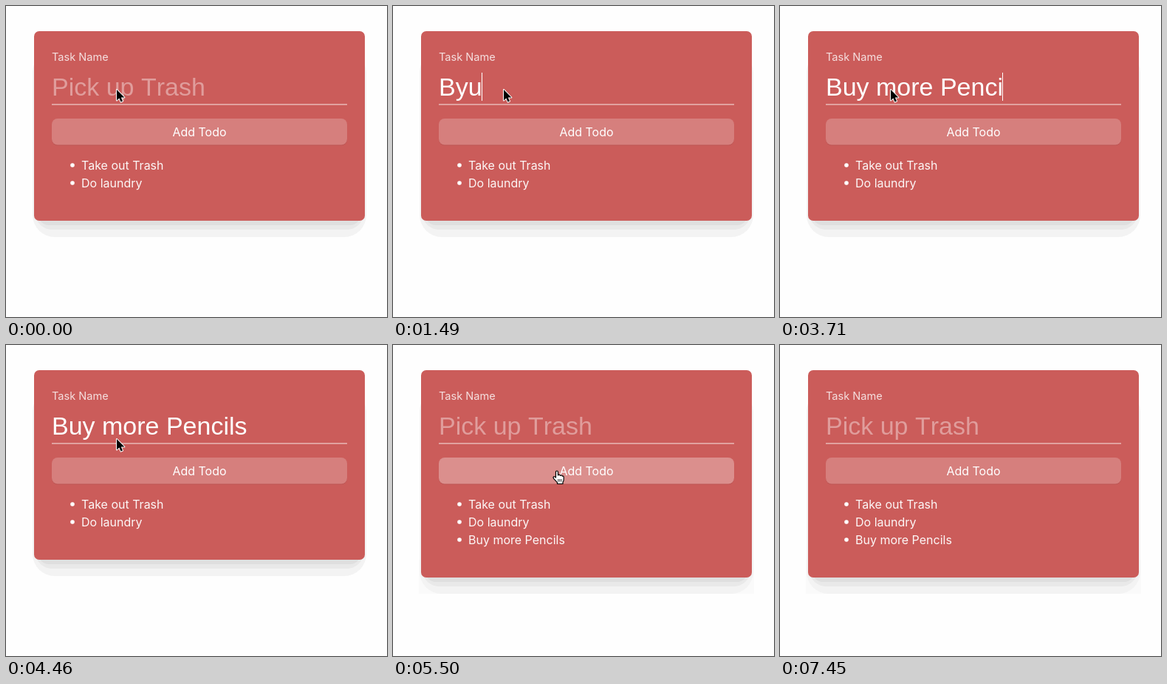
Animation of 516 by 420 pixels, one loop 8.05 s. Source, as an HTML page with a canvas:

```html
<!DOCTYPE html>
<html lang="en">
<head>
<meta charset="utf-8">
<title>Todo form</title>
<style>
  html, body { margin: 0; width: 100%; height: 100%; overflow: hidden; background: #fefefe; }
  canvas { display: block; width: 516px; height: 420px; }
</style>
</head>
<body>
<canvas id="stage" width="516" height="420"></canvas>
<script>
const ctx = document.getElementById('stage').getContext('2d');
const LOOP = 8050;
const UI = 'Inter, "Open Sans", sans-serif';
const FIELD = '34px "Liberation Sans", Arial, sans-serif';
const ITEMS = ['Take out Trash', 'Do laundry', 'Buy more Pencils'];

// Each track lists [start time, value]; values hold until the next entry.
const typed = [
  [0, ''], [1190, 'B'], [1490, 'Byu'], [2090, 'By'], [2240, 'B'], [2380, 'Bu'],
  [2530, 'Buy '], [2830, 'Buy mor'], [2980, 'Buy more '], [3120, 'Buy more P'],
  [3420, 'Buy more Pe'], [3570, 'Buy more Penc'], [3710, 'Buy more Penci'],
  [3860, 'Buy more Pencils'], [5500, '']
];
const caret = [
  [0, false], [440, true], [890, false], [1190, true],
  [4310, false], [4760, true], [5350, false]
];
const pointer = [
  [0, ['arrow', 150, 113]], [4010, ['arrow', 149.5, 114]], [4160, ['arrow', 149, 117]],
  [4310, ['arrow', 149, 122]], [4460, ['arrow', 150, 127]], [4610, ['arrow', 168, 140]],
  [4760, ['arrow', 196, 157]], [4900, ['hand', 216.5, 169.5]], [6850, ['hand', 210, 169.5]],
  [7300, ['arrow', 202, 203]], [7450, null]
];
const buttonGlow = [[0, 0.21], [5350, 0.31], [7300, 0.25], [7450, 0.21]];

const arrowPath = new Path2D('M0 0V14.6L3.4 11.5L5.6 16.6L8 15.6L5.8 10.6H10.4Z');
const handPath = new Path2D('M4 9.5V2.2q0-1.7 1.5-1.7t1.5 1.7V6.5q.3-.8 1.5-.8t1.5 1.2' +
  'q.3-.6 1.4-.6t1.4 1.3q1.9-.6 1.9 1.5v3.2q0 2-1.2 3.4v2.3H6v-1.8L1 10.8Q0 9 1.3 8.4T4 9.5Z');
const knuckles = new Path2D('M7.3 11.5v3.6M9.4 11.5v3.6M11.5 11.5v3.6');

function at(track, t) {
  let value = track[0][1];
  for (const [start, v] of track) if (t >= start) value = v;
  return value;
}

const white = alpha => `rgba(255,255,255,${alpha})`;

function box(x, y, right, bottom, radius, color) {
  ctx.fillStyle = color;
  ctx.beginPath();
  ctx.roundRect(x, y, right - x, bottom - y, radius);
  ctx.fill();
}

function text(str, x, y, font, color, kerning = 'normal') {
  ctx.font = font;
  ctx.fontKerning = kerning;
  ctx.fillStyle = color;
  ctx.fillText(str, x, y);
}

function drawCard(bottom, grown) {
  if (grown) box(35, bottom - 24, 489, bottom + 22, 0, '#fafafa');
  box(36, 60, 488, bottom + 22, 30, '#f3f3f3');
  box(40, 80, 484, bottom + 12, 22, '#e9e9e9');
  box(44, 90, 480, bottom + 6, 14, '#dfdfdf');
  box(38, 34, 486, bottom, 7, '#cb5c5a');
}

function drawField(value, showCaret) {
  text('Task Name', 62, 74, '14.6px ' + UI, white(0.8));
  text(value || 'Pick up Trash', 62, 121, FIELD, value ? '#fff' : white(0.4), 'none');
  if (showCaret) {
    const width = value ? ctx.measureText(value).width : 0;
    ctx.fillStyle = '#fff';
    ctx.fillRect(Math.floor(62 + width), 90, 1, 38);
  }
  ctx.fillStyle = white(0.42);
  ctx.fillRect(62, 132, 400, 2);
}

function drawButton(glow) {
  box(62, 153, 462, 188.5, 8, 'rgba(0,0,0,0.08)');
  box(62, 152, 462, 187.5, 8, '#cb5c5a');
  box(62, 152, 462, 187.5, 8, white(glow));
  ctx.textAlign = 'center';
  text('Add Todo', 262, 176, '16px ' + UI, '#fff');
  ctx.textAlign = 'left';
}

function drawList(count) {
  ITEMS.slice(0, count).forEach((item, i) => {
    const y = 215 + 24 * i;
    box(87.2, y - 2.8, 92.8, y + 2.8, 2.8, '#fff');
    text(item, 102, y + 6, '16px ' + UI, white(0.95));
  });
}

function drawPointer([kind, x, y]) {
  ctx.save();
  ctx.translate(x, y);
  ctx.lineJoin = 'round';
  if (kind === 'arrow') {
    ctx.strokeStyle = '#fff';
    ctx.lineWidth = 2;
    ctx.stroke(arrowPath);
    ctx.fillStyle = '#000';
    ctx.fill(arrowPath);
  } else {
    ctx.fillStyle = '#fff';
    ctx.fill(handPath);
    ctx.strokeStyle = '#000';
    ctx.lineWidth = 1.2;
    ctx.stroke(handPath);
    ctx.lineWidth = 0.8;
    ctx.stroke(knuckles);
  }
  ctx.restore();
}

function draw(t) {
  const added = t >= 5500;
  const mouse = at(pointer, t);
  ctx.fillStyle = '#fefefe';
  ctx.fillRect(0, 0, 516, 420);
  drawCard(added ? 314 : 290, added);
  drawField(at(typed, t), at(caret, t));
  drawButton(at(buttonGlow, t));
  drawList(added ? 3 : 2);
  if (mouse) drawPointer(mouse);
}

function frame() {
  draw(performance.now() % LOOP);
  requestAnimationFrame(frame);
}
frame();
</script>
</body>
</html>
```
